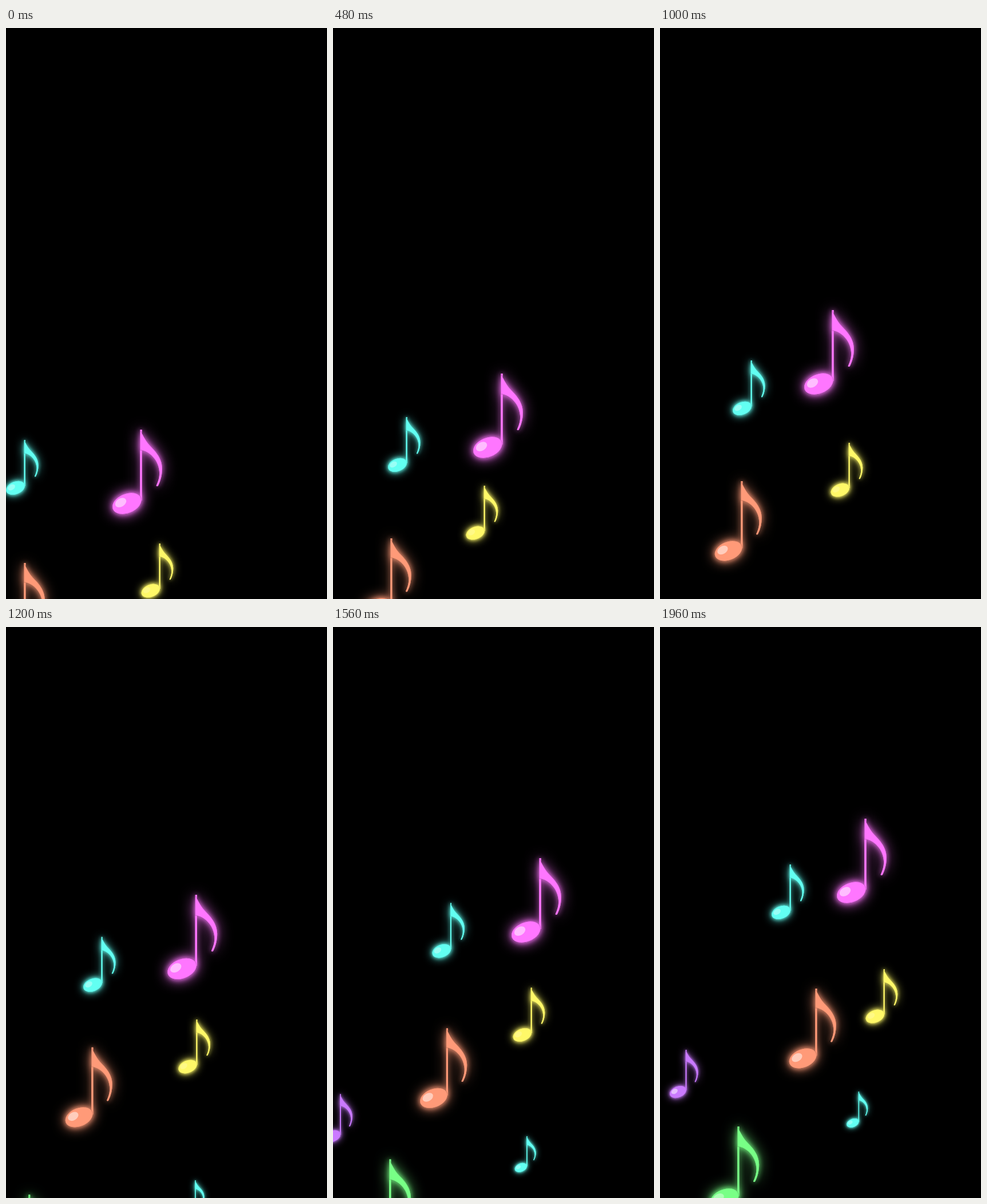
These frames come from a looping animation (561 by 998 pixels, 2000 ms). An HTML page with a canvas:

```html
<!DOCTYPE html>
<html lang="en">
<head>
<meta charset="utf-8">
<title>Floating notes</title>
<style>
  html, body { margin: 0; width: 100%; height: 100%; overflow: hidden; background: #000; }
  canvas { display: block; }
</style>
</head>
<body>
<canvas id="stage" width="561" height="998"></canvas>
<script>
const ctx = document.getElementById('stage').getContext('2d');
const LOOP = 2000, STEP = 40;

// Times at which each note's stem tip passes the listed x and y.
const full = [0, 480, 760, 1000, 1360, 1720, 1960];
const late = [1000, 1360, 1720, 1960];

const notes = [
  { color: '#78ff86', scale: 0.98, shine: 0.4, t: late,
    x: [10, 64, 121, 136], y: [1035, 961, 908, 873] },
  { color: '#ca7aff', scale: 0.57, shine: 0.5, t: late,
    x: [-65, -15, 30, 45], y: [905, 846, 791, 739] },
  { color: '#62fff2', scale: 0.425, shine: 0.3, t: late,
    x: [326, 334, 342, 347], y: [1018, 929, 860, 812] },
  { color: '#ff9a78', scale: 0.945, shine: 0.5, t: full,
    x: [32, 101, 95, 142, 157, 238, 272], y: [935, 892, 812, 792, 702, 701, 632] },
  { color: '#fff868', scale: 0.64, shine: 0.2, t: full,
    x: [268, 264, 304, 330, 335, 360, 391], y: [901, 800, 762, 725, 657, 614, 598] },
  { color: '#62fff2', scale: 0.65, shine: 0.35, t: full,
    x: [32, 128, 163, 159, 179, 222, 227], y: [720, 680, 632, 581, 513, 458, 415] },
  { color: '#ff76ff', scale: 1, shine: 0.52, t: [0, 480, 560, 760, 1000, 1120, 1360, 1560, 1720, 1960],
    x: [235, 294, 301, 286, 301, 322, 346, 361, 356, 358],
    y: [702, 604, 594, 535, 493, 480, 441, 404, 374, 335] }
];

// Unit note, with the stem tip at the origin.
const TILT = -0.384;
const head = new Path2D();
head.ellipse(-23.7, 129, 26.5, 17, TILT, 0, Math.PI * 2);

const flag = new Path2D();
flag.moveTo(-0.6, 0);
flag.bezierCurveTo(3, 7, 8, 18, 15, 26);
flag.bezierCurveTo(22, 34, 38, 47, 38, 68);
flag.bezierCurveTo(38, 78, 36, 88, 31, 98);
flag.quadraticCurveTo(29, 100, 27.5, 98);
flag.bezierCurveTo(31, 90, 33.5, 83, 33, 74);
flag.bezierCurveTo(32, 57, 20, 40, 2, 36);
flag.lineTo(-0.6, 36);
flag.closePath();

const body = new Path2D();
body.addPath(head);
body.addPath(flag);
body.rect(-0.6, 0, 3.1, 124);

const shine = new Path2D();
shine.ellipse(-34.5, 127.5, 10.5, 7.2, -0.55, 0, Math.PI * 2);

// Smooth curve through the keys, without overshoot.
function curve(t, keys, now) {
  const last = keys.length - 1;
  let i = 0;
  while (i < last - 1 && now > t[i + 1]) i++;
  const slope = k => (keys[k + 1] - keys[k]) / (t[k + 1] - t[k]);
  const tangent = k => {
    if (k === 0) return slope(0);
    if (k === last) return slope(last - 1);
    const a = slope(k - 1), b = slope(k);
    return a * b > 0 ? 2 * a * b / (a + b) : 0;
  };
  const span = t[i + 1] - t[i];
  const u = Math.min(1, (now - t[i]) / span), v = 1 - u;
  return keys[i] * v * v * (1 + 2 * u) + keys[i + 1] * u * u * (3 - 2 * u)
    + span * u * v * (tangent(i) * v - tangent(i + 1) * u);
}

function drawNote(note, now) {
  if (now < note.t[0]) return;
  const s = note.scale;
  ctx.save();
  ctx.translate(curve(note.t, note.x, now), curve(note.t, note.y, now));
  ctx.scale(s, s);
  ctx.fillStyle = ctx.shadowColor = note.color;
  for (const blur of [24, 10]) {
    ctx.shadowBlur = blur * s;
    ctx.fill(body);
  }
  ctx.shadowBlur = 0;
  ctx.shadowColor = 'transparent';
  ctx.strokeStyle = 'rgba(0,0,0,0.13)';
  ctx.lineWidth = 1.4;
  ctx.stroke(head);
  ctx.stroke(flag);
  ctx.fillStyle = `rgba(255,255,255,${note.shine})`;
  ctx.fill(shine);
  ctx.restore();
}

function frame(ms) {
  const now = Math.floor((ms % LOOP) / STEP) * STEP;
  ctx.fillStyle = '#000';
  ctx.fillRect(0, 0, 561, 998);
  for (const note of notes) drawNote(note, now);
}

const start = performance.now();
function tick() {
  frame(performance.now() - start);
  requestAnimationFrame(tick);
}
tick();
</script>
</body>
</html>
```
